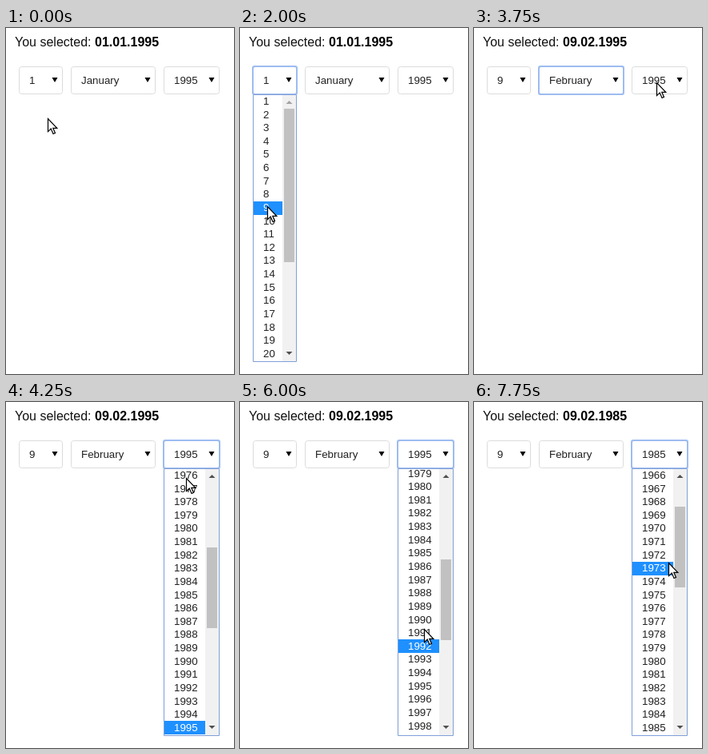
An HTML page with a canvas that plays this animation: 285 by 433 pixels, repeating every 8 s.

```html
<!DOCTYPE html>
<html lang="en">
<head>
<meta charset="utf-8">
<title>Date dropdowns</title>
<style>
  html, body { margin: 0; width: 100%; height: 100%; overflow: hidden; background: #fff; }
  canvas { display: block; width: 285px; height: 433px; }
</style>
</head>
<body>
<canvas></canvas>
<script>
const WIDTH = 285, HEIGHT = 433, LOOP = 8000;
const ROW = 16.63, LIST_TOP = 83.5, VISIBLE = 20;
const TRACK_TOP = 101, TRACK = 297;
const FONT = '"Liberation Sans", Arial, sans-serif';

const canvas = document.querySelector('canvas');
const ratio = window.devicePixelRatio || 1;
canvas.width = WIDTH * ratio;
canvas.height = HEIGHT * ratio;
const ctx = canvas.getContext('2d');
ctx.scale(ratio, ratio);

const range = (from, count) => Array.from({ length: count }, (_, i) => String(from + i));
const selects = {
  day: { x: 16, w: 55, options: range(1, 31) },
  month: { x: 81, w: 106, options: ['January', 'February', 'March', 'April', 'May', 'June', 'July',
    'August', 'September', 'October', 'November', 'December'] },
  year: { x: 197, w: 70, options: range(1960, 59) }
};
const pointer = new Path2D('M.5 .5V16.6L4.2 13.1L7 19.5L9.5 18.4L6.8 12.3H11.8Z');

// Each step only lists what changes; hot and scroll are option indexes.
const steps = [
  { t: 0, at: [52, 113], day: 0, month: 0, year: 35, focus: null, open: null, hot: 0, scroll: 0 },
  { t: 250, at: [50, 66], focus: 'day' },
  { t: 500, at: [47, 72], open: 'day', hot: 0 },
  { t: 750, at: [40, 190], hot: 6 },
  { t: 1000, at: [36, 320], hot: 14 },
  { t: 1250, at: [34, 406], hot: 19 },
  { t: 1500, at: [33, 352], hot: 16 },
  { t: 1750, at: [33, 272], hot: 11 },
  { t: 2000, at: [34, 223], hot: 8 },
  { t: 2250, at: [36, 222], day: 8, open: null },
  { t: 2500, at: [176, 66] },
  { t: 2750, at: [152, 74], focus: 'month', open: 'month', hot: 0 },
  { t: 3000, at: [126, 114], hot: 1 },
  { t: 3500, at: [130, 110], month: 1, open: null },
  { t: 3750, at: [228, 68] },
  { t: 4250, at: [225, 95], focus: 'year', open: 'year', hot: 35, scroll: 16 },
  { t: 4500, at: [227, 180], hot: 21 },
  { t: 4750, at: [229, 270], hot: 27 },
  { t: 5000, at: [231, 360], hot: 32 },
  { t: 5250, at: [232, 402], hot: 38, scroll: 19.14 },
  { t: 5500, at: [232, 385], hot: 37 },
  { t: 5750, at: [231, 335], hot: 34 },
  { t: 6000, at: [230, 284], hot: 32 },
  { t: 6250, at: [232, 232], hot: 28 },
  { t: 6500, at: [235, 185], hot: 25 },
  { t: 6750, at: [238, 158], year: 25, open: null },
  { t: 7000, at: [243, 72] },
  { t: 7250, at: [243, 90], open: 'year', hot: 25, scroll: 6 },
  { t: 7500, at: [244, 150], hot: 10 },
  { t: 7750, at: [243, 201], hot: 13 }
];

function write(text, x, y, color = '#222', font = '13.333px ') {
  ctx.fillStyle = color;
  ctx.font = font + FONT;
  ctx.fillText(text, x, y);
}

function fillRect(x, y, w, h, color) {
  ctx.fillStyle = color;
  ctx.fillRect(x, y, w, h);
}

function strokeBox(x, y, w, h, radius, color, width = 1) {
  ctx.strokeStyle = color;
  ctx.lineWidth = width;
  ctx.beginPath();
  ctx.roundRect(x, y, w, h, radius);
  ctx.stroke();
}

// A negative height points the triangle up.
function triangle(cx, cy, w, h, color) {
  ctx.fillStyle = color;
  ctx.beginPath();
  ctx.moveTo(cx - w / 2, cy - h / 2);
  ctx.lineTo(cx + w / 2, cy - h / 2);
  ctx.lineTo(cx, cy + h / 2);
  ctx.fill();
}

function drawSelect({ x, w, options }, value, focused) {
  strokeBox(x + .5, 48.5, w - 1, 34, 3, '#dcdcdc');
  if (focused) strokeBox(x, 48, w, 35, 2, '#9dbcf0', 2);
  write(options[value], x + 13, 70);
  triangle(x + w - 10, 65, 7, 6, '#000');
}

function drawList({ x, w, options }, hot, scroll) {
  const scrolls = options.length > VISIBLE;
  const height = Math.round(Math.min(options.length, VISIBLE) * ROW);
  const right = x + w - 1;
  const rowWidth = w - 2 - (scrolls ? 17 : 0);

  fillRect(x, 83, w, height + 2, '#fff');
  ctx.save();
  ctx.beginPath();
  ctx.rect(x, 84, w, height);
  ctx.clip();
  options.forEach((label, i) => {
    const top = LIST_TOP + (i - scroll) * ROW;
    if (top < LIST_TOP - ROW || top > LIST_TOP + height) return;
    if (i === hot) fillRect(x + 1, Math.round(top), rowWidth, 17, '#1e90ff');
    write(label, x + 13, Math.round(top + 12.4), i === hot ? '#fff' : '#222');
  });
  ctx.restore();

  if (scrolls) {
    const unit = TRACK / options.length;
    fillRect(right - 17, 84, 17, height, '#f1f1f1');
    fillRect(right - 15, Math.round(TRACK_TOP + scroll * unit), 13, Math.round(VISIBLE * unit), '#c1c1c1');
    triangle(right - 8.5, 93, 8, -4, scroll ? '#505050' : '#a3a3a3');
    triangle(right - 8.5, 407, 8, 4, '#505050');
  }
  strokeBox(x + .5, 83.5, w - 1, height + 1, 0, '#7f9fd8');
}

function drawPointer([x, y]) {
  ctx.save();
  ctx.translate(x, y);
  ctx.fillStyle = '#fff';
  ctx.strokeStyle = '#000';
  ctx.lineWidth = 1.2;
  ctx.fill(pointer);
  ctx.stroke(pointer);
  ctx.restore();
}

function draw(time) {
  const state = Object.assign({}, ...steps.filter(step => step.t <= time));
  const pad = index => String(index + 1).padStart(2, '0');
  fillRect(0, 0, WIDTH, HEIGHT, '#fff');
  write('You selected:', 11, 23, '#111', '16px ');
  write(`${pad(state.day)}.${pad(state.month)}.${selects.year.options[state.year]}`, 111, 23, '#000', 'bold 16px ');
  for (const name in selects) drawSelect(selects[name], state[name], state.focus === name);
  if (state.open) drawList(selects[state.open], state.hot, state.scroll);
  drawPointer(state.at);
}

function tick() {
  draw(performance.now() % LOOP);
  requestAnimationFrame(tick);
}
tick();
</script>
</body>
</html>
```
